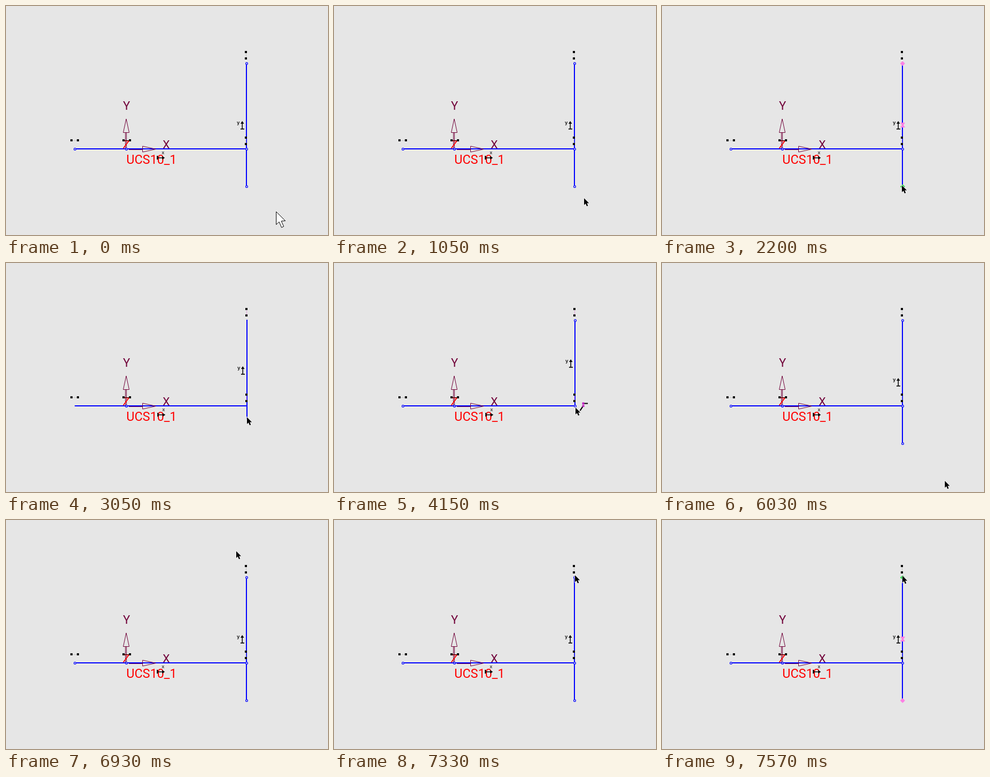
Animation of 600 by 428 pixels, one loop 8 s. Source, as an HTML page with a canvas:

```html
<!DOCTYPE html>
<html>
<head>
<meta charset="utf-8">
<style>
html, body { margin: 0; width: 100%; height: 100%; overflow: hidden; background: #e6e6e6; }
canvas { display: block; width: 600px; height: 428px; }
</style>
</head>
<body>
<canvas id="stage" width="600" height="428"></canvas>
<script>
const ctx = document.getElementById('stage').getContext('2d');
const LOOP = 8000;
const BG = '#e6e6e6', BLUE = '#0000ff', MAROON = '#700038', RED = '#ff0000';
const PINK = '#ff80e4', GREEN = '#20d840', PURPLE = '#c020c0';
const TOP = 107, BASE = 267, LEFT = 128, BOTTOM = 337;

const smooth = p => p * p * (3 - 2 * p);
const slowDown = p => 1 - Math.pow(1 - p, 1.55);
const jump = p => p < 1 ? 0 : 1;

// Pointer path: time, x, y, easing used to arrive there
const PATH = [
  [0, 502, 383], [560, 502, 383],
  [1360, 446, 345, smooth], [1420, 446, 344, jump],
  [1620, 446, 344], [1720, 446, 341, smooth],
  [1920, 446, 341], [2200, 446, 334, smooth],
  [2660, 446, 334], [3350, 449, 269, slowDown],
  [4250, 449, 269], [4350, 537, 397, smooth],
  [5070, 526, 406, jump], [6430, 519, 387, jump],
  [6590, 519, 387], [6930, 428, 57, smooth],
  [7060, 428, 57], [7390, 450, 106, smooth],
  [7420, 450, 106], [7570, 447, 103, smooth],
  [LOOP, 447, 103]
];

function pointerAt(t) {
  const i = Math.max(1, PATH.findIndex(k => k[0] > t));
  const a = PATH[i - 1], b = PATH[i];
  const ease = b[3] || (p => p);
  const p = ease((t - a[0]) / (b[0] - a[0]));
  return [Math.round(a[1] + (b[1] - a[1]) * p), Math.round(a[2] + (b[2] - a[2]) * p)];
}

function rect(x, y, w, h, color) {
  ctx.fillStyle = color;
  ctx.fillRect(x, y, w, h);
}

function trace(points, closed) {
  ctx.beginPath();
  points.forEach(([x, y]) => ctx.lineTo(x, y));
  if (closed) ctx.closePath();
}

function stroke(points, color, width = 1, closed = false) {
  trace(points, closed);
  ctx.strokeStyle = color;
  ctx.lineWidth = width;
  ctx.stroke();
}

function fill(points, color) {
  trace(points, true);
  ctx.fillStyle = color;
  ctx.fill();
}

function label(text, x, y, font, color) {
  ctx.font = font;
  ctx.fillStyle = color;
  ctx.fillText(text, x, y);
}

function node(x, y, inside = BG) {
  ctx.beginPath();
  ctx.arc(x + 0.5, y + 0.5, 1.9, 0, 7);
  ctx.fillStyle = inside;
  ctx.fill();
  ctx.strokeStyle = BLUE;
  ctx.lineWidth = 1.2;
  ctx.stroke();
}

function diamond(x, y, color) {
  fill([[x, y - 4.5], [x + 4.5, y], [x, y + 4.5], [x - 4.5, y]], color);
}

// Pair of square dots joined by a dotted line
function pairMark(x, y, dx, dy, color) {
  for (let i = 3; i < 10; i += 2) {
    rect(x + dx * i, y + dy * i, 1, 1, color);
  }
  rect(x - 2, y - 2, 4, 4, '#000');
  rect(x - 2 + dx * 12, y - 2 + dy * 12, 4, 4, '#000');
}

function axes() {
  stroke([[222.5, 266], [222.5, 236.5], [224.5, 236.5], [224.5, 266]], MAROON);
  stroke([[224, 211], [229.5, 236.5], [218.5, 236.5]], MAROON, 1, true);
  stroke([[229, 268.5], [254, 268.5]], MAROON);
  stroke([[254.5, 262], [279, 267.5], [254.5, 273]], MAROON, 1, true);
  stroke([[219, 252], [229, 252], [218.5, 266]], RED, 1.7);
  label('Y', 217.9, 194, '22px Roboto, sans-serif', MAROON);
  label('X', 292, 266, '21px Roboto, sans-serif', MAROON);
  label('UCS10_1', 224.3, 295, '23.3px Roboto, sans-serif', RED);
}

function alongX(x) {
  label('x', x + 9, 277, 'bold 8px "DejaVu Sans", sans-serif', '#555');
  rect(x, 280, 2, 7, '#000');
  rect(x, 283, 13, 1.5, '#000');
  fill([[x + 10, 280.5], [x + 15, 283.7], [x + 10, 287]], '#000');
}

function alongY(x, y) {
  label('y', x - 10, y - 2, 'bold 8.5px "DejaVu Sans", sans-serif', '#333');
  rect(x - 0.5, y - 5, 1.5, 12, '#000');
  fill([[x - 3, y - 2.5], [x + 0.2, y - 7.5], [x + 3.5, y - 2.5]], '#000');
  rect(x - 3, y + 6.5, 7, 1.7, '#000');
}

function snapMark() {
  stroke([[458.5, 276], [464, 267.5]], '#000', 2.2);
  rect(463, 261.5, 10, 2, '#000');
  rect(462.5, 260.5, 4, 4, PURPLE);
  rect(462.5, 265.5, 4, 3.5, PURPLE);
}

const ARROW = [[1, 1.3], [1, 14], [3.9, 11.3], [6, 16.3], [8.3, 15.3], [6.2, 10.4], [10.2, 10.4]];

function pointer(x, y) {
  const points = ARROW.map(([px, py]) => [x + px, y + py]);
  stroke(points, '#f4f4f4', 1.4, true);
  fill(points, '#000');
}

function bigPointer() {
  const points = [[0, 0], [0, 24], [5.5, 19], [10, 29.5], [14, 27.5], [9.5, 17.5], [17, 17]]
    .map(([x, y]) => [503.5 + x, 384.5 + y]);
  fill(points, '#fff');
  stroke(points, '#000', 1, true);
}

function draw(t) {
  const [px, py] = pointerAt(t);
  const dragging = t >= 2660 && t < 4150;
  const moved = t >= 2660 && t < 6030;
  const snapped = moved && t >= 3250;
  const lowPick = t >= 1920 && t < 2660;
  const highPick = t >= 7420;

  const vx = moved ? 449 : 448;
  const end = !moved ? BOTTOM : snapped ? BASE : py + 5;
  const dots = moved && t < 4250 ? '#e070d8' : '#aaa';

  rect(0, 0, 600, 428, BG);
  rect(LEFT, BASE - 1, vx - LEFT, 2, BLUE);
  rect(vx - 1, TOP - 1, 2, end - TOP + 1, BLUE);
  axes();
  node(224, BASE, '#b8b8e8');

  if (!dragging) {
    node(LEFT, BASE);
    node(vx, BASE);
    node(vx, TOP);
    if (!moved) node(vx, BOTTOM);
  }

  pairMark(122, 251, 1, 0, '#aaa');
  pairMark(219, 251, 1, 0, '#400');
  rect(219, 251, 11, 1, '#300');
  pairMark(vx - 1, 86, 0, 1, dots);
  pairMark(vx - 1, 246, 0, 1, dots);
  alongX(moved ? 282 : 281);
  alongY(vx - 8, Math.round((TOP + end) / 2) + 0.5);
  if (snapped) snapMark();

  if (lowPick || highPick) {
    const lowHover = lowPick && t >= 2120, highHover = highPick && t >= 7480;
    diamond(448.3, TOP + 0.5, highHover ? GREEN : PINK);
    diamond(448.3, BOTTOM + 0.5, lowHover ? GREEN : PINK);
    fill([[444, 218], [453, 218], [450, 222.5], [453, 227], [444, 227], [447, 222.5]], PINK);
  }

  if (t < 560) bigPointer();
  else if (t < 4370 || t >= 5070) pointer(px, py);
}

const start = performance.now();
function tick() {
  draw((performance.now() - start) % LOOP);
  requestAnimationFrame(tick);
}
tick();
</script>
</body>
</html>
```
